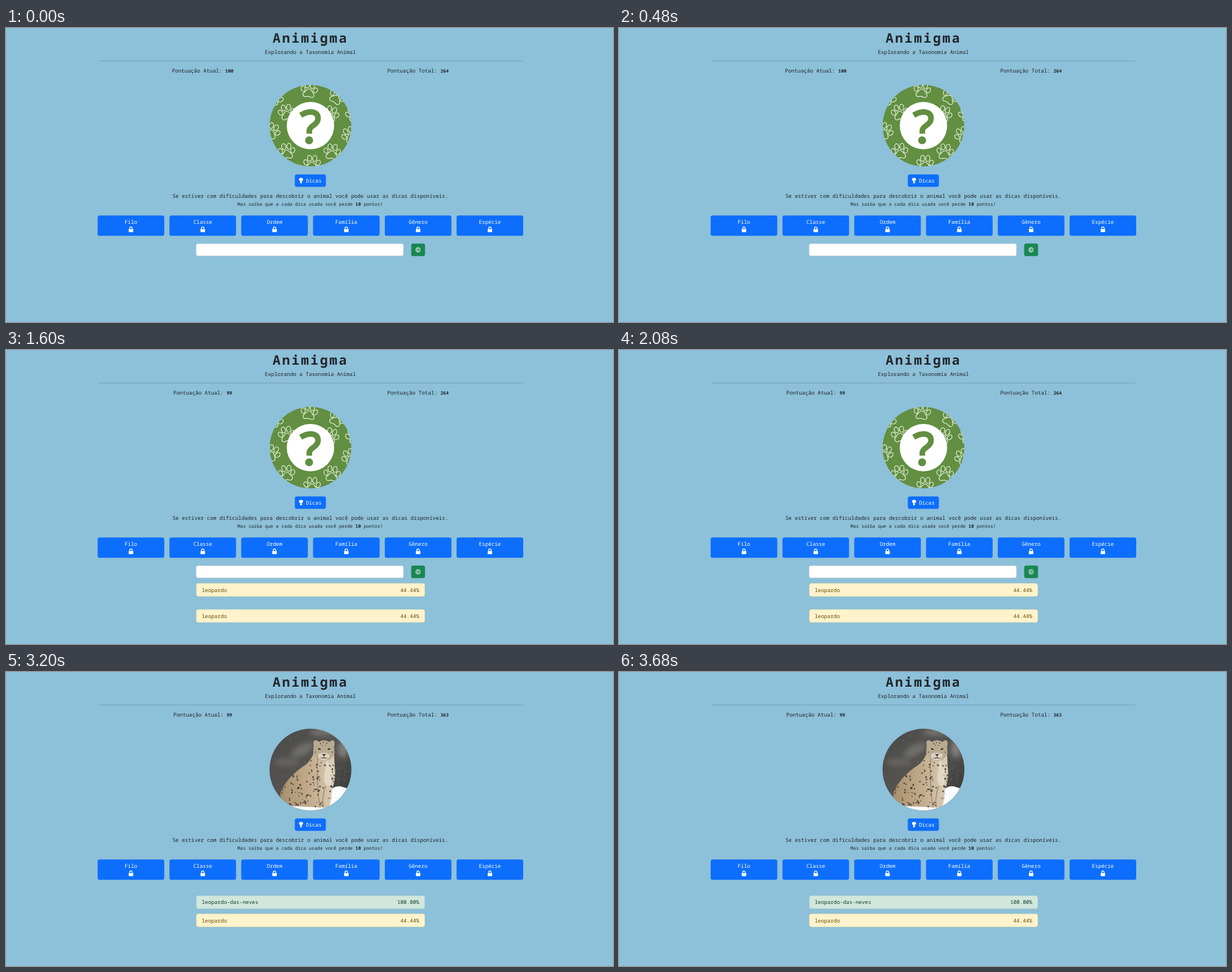
These frames come from a looping animation (1075x521 px, 4 s). An HTML page:

```html
<!DOCTYPE html>
<html lang="pt">
<head>
<meta charset="utf-8">
<title>Animigma</title>
<style>
html, body { margin: 0; width: 100%; height: 100%; overflow: hidden; background: #8dc0d9; }
svg { display: block; width: 100%; height: 100%; }
text { font: 9.25px "Roboto Mono", "Noto Sans Mono", "DejaVu Sans Mono", monospace; fill: #212529; text-rendering: geometricPrecision; }
.mid { text-anchor: middle; }
.end { text-anchor: end; }
.white { fill: #fff; }
.small { font-size: 8.1px; }
.bold { font-size: 8.1px; font-weight: 700; }
.title { font-size: 23.1px; font-weight: 700; letter-spacing: 2.9px; }
.blue { fill: #0d6efd; }
</style>
</head>
<body>
<svg viewBox="0 0 1075 521" xmlns="http://www.w3.org/2000/svg">
  <defs>
    <clipPath id="disc"><circle cx="539.2" cy="173" r="72.5"/></clipPath>
    <clipPath id="coat"><use href="#body"/></clipPath>
    <linearGradient id="woods" x1="0" y1="0" x2="1" y2="1">
      <stop offset="0" stop-color="#4a4a48"/><stop offset=".5" stop-color="#555451"/><stop offset="1" stop-color="#343432"/>
    </linearGradient>
    <linearGradient id="fur" x1="0" y1="0" x2="1" y2="0">
      <stop offset="0" stop-color="#a98f6e"/><stop offset=".55" stop-color="#c3ad8d"/><stop offset="1" stop-color="#dccfba"/>
    </linearGradient>
    <filter id="soft" x="-50%" y="-50%" width="200%" height="200%"><feGaussianBlur stdDeviation="4"/></filter>
    <path id="body" d="M546 140Q540 160 525 168Q500 186 490 206Q482 218 490 229Q498 239 518 238L573 241Q576 224 578 207Q585 186 582 168L581 145Z"/>
    <g id="paw">
      <path d="M0-1.5C4-1.5 5.5 3 8.5 6C12 10 8 14.5 3.5 12.5Q0 11-3.5 12.5C-8 14.5-12 10-8.5 6C-5.5 3-4-1.5 0-1.5Z"/>
      <ellipse cx="-11" cy="-.5" rx="3.5" ry="4.8" transform="rotate(-22 -11 -.5)"/>
      <ellipse cx="-4.6" cy="-8" rx="3.7" ry="5.3" transform="rotate(-7 -4.6 -8)"/>
      <ellipse cx="4.6" cy="-8" rx="3.7" ry="5.3" transform="rotate(7 4.6 -8)"/>
      <ellipse cx="11" cy="-.5" rx="3.5" ry="4.8" transform="rotate(22 11 -.5)"/>
    </g>
    <g id="lock">
      <path d="M-2.3-.5V-2.4A2.3 2.3 0 0 1 2.3-2.4V-.5" fill="none" stroke="#fff" stroke-width="1.3"/>
      <rect x="-4" y="-1" width="8" height="5.6" rx="1" fill="#fff"/>
    </g>
  </defs>
  <rect width="1075" height="521" fill="#8dc0d9"/>
  <text class="title mid" x="539.2" y="25.8">Animigma</text>
  <text class="mid" x="539" y="45.8">Explorando a Taxonomia Animal</text>
  <rect x="164" y="58.2" width="750.5" height=".8" fill="#7199ab"/>
  <text class="mid" x="348.4" y="78.8">Pontuação Atual: <tspan id="now" class="bold"></tspan></text>
  <text class="mid" x="729.6" y="78.8">Pontuação Total: <tspan id="total" class="bold"></tspan></text>

  <g id="mystery" clip-path="url(#disc)">
    <circle cx="539.2" cy="173" r="72.5" fill="#628f41"/>
    <g id="paws" fill="none" stroke="#eef5e8" stroke-width="1.2"/>
    <circle cx="539.2" cy="173" r="42" fill="#fff"/>
    <path d="M521.8 154.5Q532 148.5 540 148.7Q552.7 149.4 552.6 160.5Q552.4 167 544.5 172.5Q537.2 177.5 537.2 182V187.2" fill="none" stroke="#628f41" stroke-width="10"/>
    <circle cx="536.8" cy="199" r="7.1" fill="#628f41"/>
  </g>

  <g id="photo" clip-path="url(#disc)">
    <rect x="466" y="100" width="147" height="147" fill="url(#woods)"/>
    <g filter="url(#soft)">
      <ellipse cx="525" cy="138" rx="22" ry="9" fill="#85827d" opacity=".6" transform="rotate(-28 525 138)"/>
      <ellipse cx="496" cy="160" rx="22" ry="7" fill="#777570" opacity=".55"/>
      <ellipse cx="597" cy="137" rx="9" ry="15" fill="#999792" opacity=".65"/>
      <ellipse cx="560" cy="107" rx="22" ry="6" fill="#8c8984" opacity=".6"/>
    </g>
    <g id="flakes" fill="#deddd9"/>
    <path d="M570 247L577 207Q587 200 597 204L614 209V247ZM466 247V230Q492 236 515 237L580 241V247Z" fill="#fbfcfd"/>
    <use href="#body" fill="url(#fur)"/>
    <path d="M552 152Q549 194 556 240M566 202Q559 222 562 240" fill="none" stroke="#766752" stroke-width="1.4" opacity=".65"/>
    <path d="M568 155Q580 170 576 199Q566 207 563 190Z" fill="#e9dfcf" opacity=".7"/>
    <g id="spots" clip-path="url(#coat)" fill="#3d352c"/>
    <path d="M545 129Q543 121 548 121Q552 121 554 124Q563 118 573 124Q577 119 581 122Q583 126 581 132L582 144Q577 157 563 157Q547 155 544 143Z" fill="#b9aa92"/>
    <path d="M553 146Q562 140 573 146Q574 155 563 156Q551 155 553 146Z" fill="#ddd3c2"/>
    <g fill="#40372e">
      <ellipse cx="555" cy="136.5" rx="2.7" ry="1.3" transform="rotate(18 555 136.5)"/>
      <ellipse cx="572" cy="136.5" rx="2.7" ry="1.3" transform="rotate(-18 572 136.5)"/>
      <path d="M559.5 145.5H567L564.3 148.5H562ZM563 148H563.8V151.5Q568 153 571 151Q567 154.5 563.4 152.5Q559 154.5 556 151Q560 153 563 151Z"/>
      <circle cx="557" cy="127" r="1"/><circle cx="562" cy="125" r="1"/><circle cx="568" cy="126" r="1"/>
      <circle cx="560" cy="130" r=".8"/><circle cx="566" cy="130" r=".8"/><circle cx="548" cy="142" r=".9"/><circle cx="578" cy="142" r=".9"/>
    </g>
  </g>

  <rect class="blue" x="511.5" y="259.5" width="55" height="22" rx="3.5"/>
  <path class="white" d="M520.8 272.2Q520.8 271 519.7 270Q518.7 268.9 518.8 267.9Q519.3 265.5 522.5 265.4Q525.7 265.5 526.2 267.9Q526.3 268.9 525.3 270Q524.2 271 524.2 272.2ZM520.8 272.8H524.2V274.2Q522.5 276.6 520.8 274.2Z"/>
  <text class="white" x="531.2" y="273.8">Dicas</text>
  <text class="mid" x="539" y="301.2">Se estiver com dificuldades para descobrir o animal você pode usar as dicas disponíveis.</text>
  <text class="mid small" x="538.7" y="315">Mas saiba que a cada dica usada você perde <tspan class="bold">10</tspan> pontos!</text>
  <g id="hints"></g>

  <g id="form">
    <rect id="glow" x="335.3" y="380.8" width="370" height="24.4" rx="4.8" fill="none" stroke="#0d6efd" stroke-opacity=".3" stroke-width="2.4"/>
    <rect id="box" x="336.8" y="382.3" width="367" height="21.5" rx="3.4" fill="#fff" stroke-width=".7"/>
    <text id="typed" x="344" y="396.6"></text>
    <rect id="caret" y="387.5" width=".8" height="11.4" fill="#212529"/>
    <rect x="717.6" y="382" width="24.5" height="22.2" rx="3.5" fill="#198754"/>
    <g id="go">
      <circle class="white" cx="729.8" cy="393.1" r="4.8"/>
      <path d="M727 393.1H732.3M730.2 390.9L732.4 393.1L730.2 395.3" fill="none" stroke="#198754" stroke-width="1"/>
    </g>
  </g>
  <g id="rows"></g>
</svg>
<script>
const $ = id => document.getElementById(id);
const STEP = 800, CHAR = 5.55;

function seeded(seed) {
  return () => (seed = (seed * 16807) % 2147483647) / 2147483647;
}

// x, y, rotation
$('paws').innerHTML = [
  [537, 109.5, 8], [587, 121, 32], [497, 149, -8], [575, 152, 18], [471, 182, 24],
  [609, 189, -24], [616, 151, -15], [497, 218, -4], [577.5, 219, 6], [542, 239, 2], [477, 122, 30]
].map(([x, y, a]) => `<use href="#paw" transform="translate(${x} ${y}) rotate(${a})"/>`).join('');

$('hints').innerHTML = ['Filo', 'Classe', 'Ordem', 'Família', 'Gênero', 'Espécie'].map((name, i) => {
  const x = 221.3 + 127.14 * i;
  return `<rect class="blue" x="${x - 59}" y="332.3" width="118" height="36" rx="3.5"/>
    <text class="white mid" x="${x}" y="346.8">${name}</text>
    <use href="#lock" transform="translate(${x} 357.2)"/>`;
}).join('');

function scatter(id, seed, count, shape) {
  const rnd = seeded(seed);
  $(id).innerHTML = Array.from({ length: count }, () => shape(rnd)).join('');
}
scatter('flakes', 71, 90, r =>
  `<circle cx="${466 + r() * 147}" cy="${100 + r() * 130}" r="${.25 + r() * .5}" opacity="${.2 + r() * .5}"/>`);
scatter('spots', 29, 125, r => {
  const x = 483 + r() * 100, y = 155 + r() * 86;
  return `<ellipse cx="${x}" cy="${y}" rx="${1 + r() * 1.5}" ry="${.8 + r() * 1.1}" opacity="${.5 + r() * .4}" transform="rotate(${r() * 180} ${x} ${y})"/>`;
});

const themes = {
  near: ['#fff3cd', '#ffe69c', '#664d03'],
  exact: ['#d1e7dd', '#badbcc', '#0f3d29']
};
function row(y, word, score, theme) {
  const [fill, line, ink] = themes[theme];
  return `<rect x="337.2" y="${y}" width="404.2" height="22.6" rx="3.4" fill="${fill}" stroke="${line}" stroke-width=".6"/>
    <text x="346.8" y="${y + 14.8}" style="fill:${ink}">${word}</text>
    <text class="end" x="731.8" y="${y + 14.8}" style="fill:${ink}">${score}</text>`;
}
const near = y => row(y, 'leopardo', '44.44%', 'near');
const tries = near(413.8) + near(460);

const scenes = [
  { now: 100, total: 264, typed: '', go: .55, rows: '' },
  { now: 100, total: 264, typed: 'leopardo', go: .65, rows: '' },
  { now: 99, total: 264, typed: '', go: .5, rows: tries },
  { now: 99, total: 264, typed: 'leopardo-das-neves', go: .9, rows: tries },
  { now: 99, total: 363, typed: '', go: 0, solved: true,
    rows: row(396.6, 'leopardo-das-neves', '100.00%', 'exact') + near(428.8) }
];

const show = (id, on) => $(id).setAttribute('display', on ? 'inline' : 'none');

function render(s) {
  const focus = s.typed !== '';
  $('now').textContent = s.now;
  $('total').textContent = s.total;
  $('typed').textContent = s.typed;
  $('caret').setAttribute('x', 343.9 + s.typed.length * CHAR);
  $('box').setAttribute('stroke', focus ? '#86b7fe' : '#ced4da');
  $('go').setAttribute('opacity', s.go);
  $('rows').innerHTML = s.rows;
  show('glow', focus);
  show('caret', focus);
  show('form', !s.solved);
  show('mystery', !s.solved);
  show('photo', s.solved);
}

const start = performance.now();
let current = -1;
function tick() {
  const i = Math.floor((performance.now() - start) / STEP) % scenes.length;
  if (i !== current) render(scenes[current = i]);
  requestAnimationFrame(tick);
}
tick();
</script>
</body>
</html>
```
